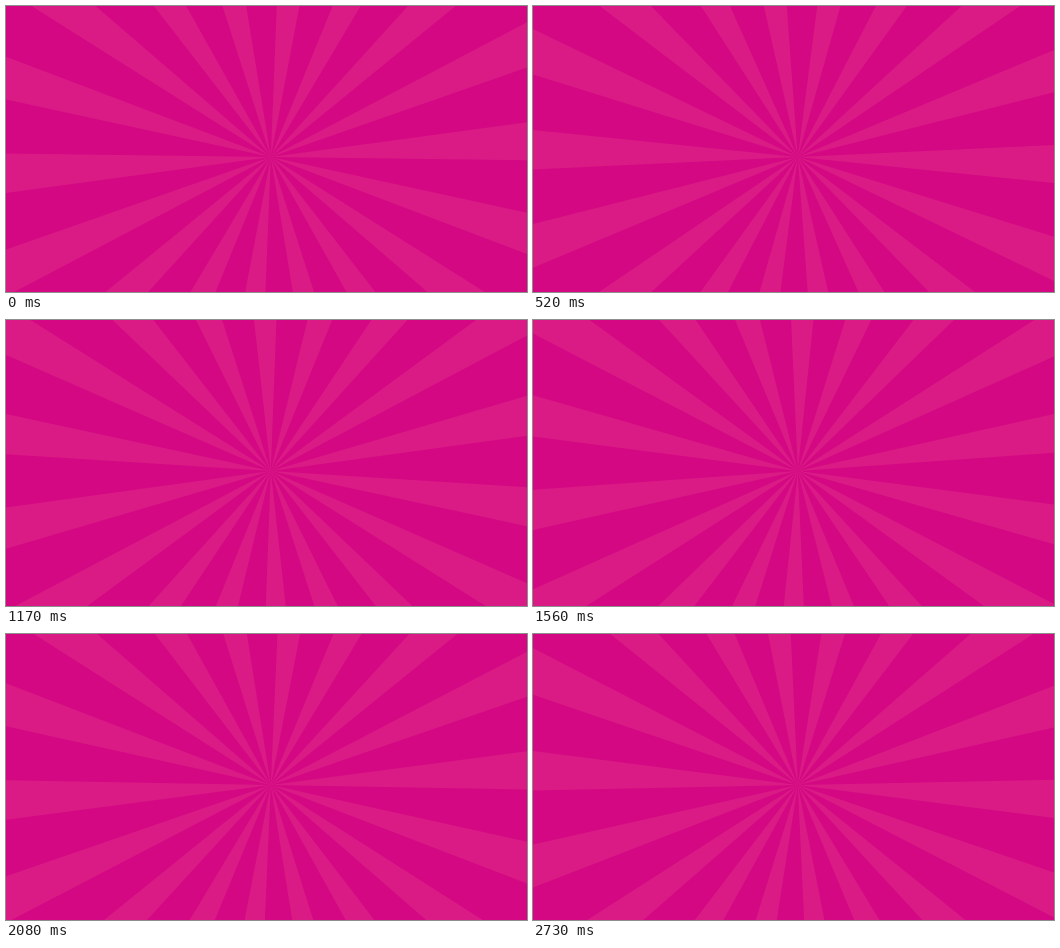
Recreate the animation shown at these times as an HTML page with a canvas. Size 521 by 286 pixels, loop 2860 ms.

```html
<!DOCTYPE html>
<html lang="en">
<head>
<meta charset="utf-8">
<title>Turning sunburst</title>
<style>
  html, body { margin: 0; width: 100%; height: 100%; overflow: hidden; background: #d30882; }
  canvas { display: block; }
</style>
</head>
<body>
<canvas id="stage" width="521" height="286"></canvas>
<script>
const ctx = document.getElementById('stage').getContext('2d');
const LOOP = 2860, STEP = 130;
const CX = 264.8, CY = 151, REACH = 400;
const RAYS = 18, WIDTH = 8.5;         // degrees
const START = -3.5, TURN = 1.266;     // degrees, degrees per step
const rad = deg => deg * Math.PI / 180;

function draw(step) {
  ctx.fillStyle = '#d30882';
  ctx.fillRect(0, 0, 521, 286);
  ctx.fillStyle = '#da1b86';
  ctx.beginPath();
  for (let i = 0; i < RAYS; i++) {
    const mid = START + TURN * step + i * 360 / RAYS;
    ctx.moveTo(CX, CY);
    for (const side of [-WIDTH / 2, WIDTH / 2]) {
      const a = rad(mid + side);
      ctx.lineTo(CX + REACH * Math.cos(a), CY + REACH * Math.sin(a));
    }
    ctx.closePath();
  }
  ctx.fill();
}

const begin = performance.now();
function tick() {
  draw(Math.floor((performance.now() - begin) % LOOP / STEP));
  requestAnimationFrame(tick);
}
tick();
</script>
</body>
</html>
```
